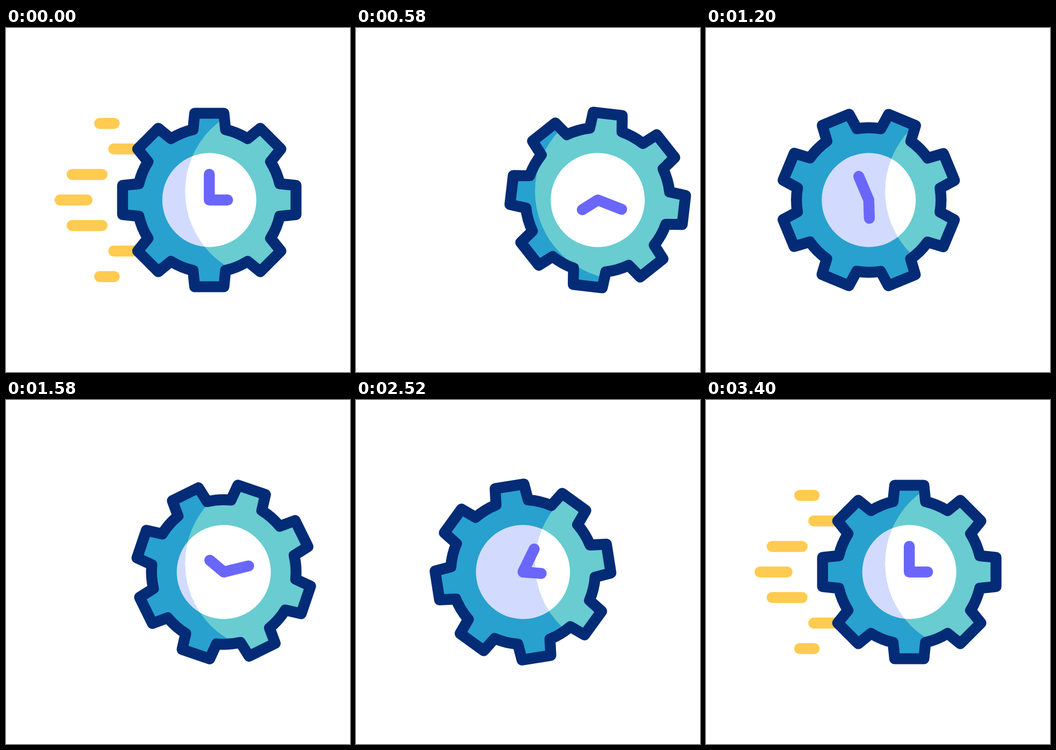
Animation, 640 px wide and 640 px high, one loop 3.6 s. Source, as an HTML page with a canvas:

```html
<!DOCTYPE html>
<html lang="en">
<head>
<meta charset="utf-8">
<title>Gear clock</title>
<style>
html, body { margin: 0; width: 100%; height: 100%; overflow: hidden; background: #fff; }
canvas { display: block; width: 640px; height: 640px; }
</style>
</head>
<body>
<canvas id="stage" width="640" height="640"></canvas>
<script>
const ctx = document.getElementById('stage').getContext('2d');
const LOOP = 3600, STEP = 20, END = 3400;
const SIZE = 640, MIDDLE = SIZE / 2, STROKE = 20.4, TEETH = 8;
const NAVY = '#042b76', LIGHT = '#68ccd1', DARK = '#28a1ce';
const YELLOW = '#ffcb50', PURPLE = '#6a66fa', PALE = '#d2dbfd';
const RAD = Math.PI / 180;

// Smooth progress from 0 to 1 between two times
function ease(t, from, to) {
  const u = Math.min(1, Math.max(0, (t - from) / (to - from)));
  return u * u * (3 - 2 * u);
}

const mix = (a, b, u) => a + (b - a) * u;

// The gear shuttles right and left, changing direction every 600 ms.
function gearX(t) {
  const beat = 600, rest = 378.2, right = 450, left = 302.8;
  const leg = Math.floor(t / beat);
  const turningPoint = n => n === 0 || n > 4 ? rest : n % 2 ? right : left;
  return mix(turningPoint(leg), turningPoint(leg + 1), ease(t, leg * beat, (leg + 1) * beat));
}

// Wind up to a peak, unwind past zero until `reverse`, then settle back.
function wind(t, peak, overshoot, reverse) {
  const top = 1800;
  return peak * ease(t, 0, top)
    + (overshoot - peak) * ease(t, top, reverse)
    - overshoot * ease(t, reverse, END);
}

function makeDisc(x, y, radius) {
  const path = new Path2D();
  path.arc(x, y, radius, 0, 2 * Math.PI);
  return path;
}

function makeGear() {
  const path = new Path2D(), pitch = 360 / TEETH * RAD;
  const ring = 134.5, rootHalf = 13 * RAD;
  const tip = 163.6, tipHalf = 9.54 * RAD;
  for (let i = 0; i < TEETH; i++) {
    const mid = i * pitch;
    for (const a of [mid - tipHalf, mid + tipHalf]) {
      path.lineTo(tip * Math.cos(a), tip * Math.sin(a));
    }
    path.arc(0, 0, ring, mid + rootHalf, mid + pitch - rootHalf);
  }
  path.closePath();
  return path;
}

const gear = makeGear();
const face = makeDisc(0, 0, 87.5);
const glow = makeDisc(497, 304, 164);

function drawLine(x, y, length) {
  ctx.beginPath();
  ctx.moveTo(x, y);
  ctx.lineTo(x + length, y);
  ctx.stroke();
}

// Rows mirror each other above and below the middle one.
function drawSpeedLines(amount) {
  if (amount <= 0) return;
  const gap = 47.5;
  const rows = [{ x: 100.5, length: 50.3 }, { x: 123, length: 55.8 },
                { x: 200.4, length: 45.6 }, { x: 174.3, length: 27 }];
  ctx.strokeStyle = YELLOW;
  rows.forEach(({ x, length }, i) => {
    drawLine(x, MIDDLE - i * gap, length * amount);
    if (i) drawLine(x, MIDDLE + i * gap, length * amount);
  });
}

function fillBody(place, gearColor, faceColor) {
  ctx.save();
  place();
  ctx.fillStyle = gearColor;
  ctx.fill(gear);
  ctx.fillStyle = faceColor;
  ctx.fill(face);
  ctx.restore();
}

function drawHands(longTurn, shortTurn) {
  const tip = (length, degrees) =>
    [length * Math.sin(degrees * RAD), -length * Math.cos(degrees * RAD)];
  ctx.strokeStyle = PURPLE;
  ctx.beginPath();
  ctx.moveTo(...tip(47.7, longTurn));
  ctx.lineTo(0, 0);
  ctx.lineTo(...tip(34, shortTurn));
  ctx.stroke();
}

function render(t) {
  const x = gearX(t), turn = wind(t, 395, -20, 3000);
  const place = () => {
    ctx.translate(x, MIDDLE);
    ctx.rotate(turn * RAD);
  };

  ctx.fillStyle = '#fff';
  ctx.fillRect(0, 0, SIZE, SIZE);
  ctx.lineWidth = STROKE;
  ctx.lineCap = ctx.lineJoin = 'round';

  drawSpeedLines(1 - ease(t, 0, 400) + ease(t, 2800, 3200));
  fillBody(place, DARK, PALE);

  // The lit area stays still while the gear moves through it.
  ctx.save();
  ctx.clip(glow);
  fillBody(place, LIGHT, '#fff');
  ctx.restore();

  ctx.save();
  place();
  ctx.strokeStyle = NAVY;
  ctx.stroke(gear);
  drawHands(wind(t, 60, -138, 2800), 90 + wind(t, 210, -200, 2800));
  ctx.restore();
}

const start = performance.now();
function tick() {
  const t = (performance.now() - start) % LOOP;
  render(Math.floor(t / STEP) * STEP);
  requestAnimationFrame(tick);
}
tick();
</script>
</body>
</html>
```
